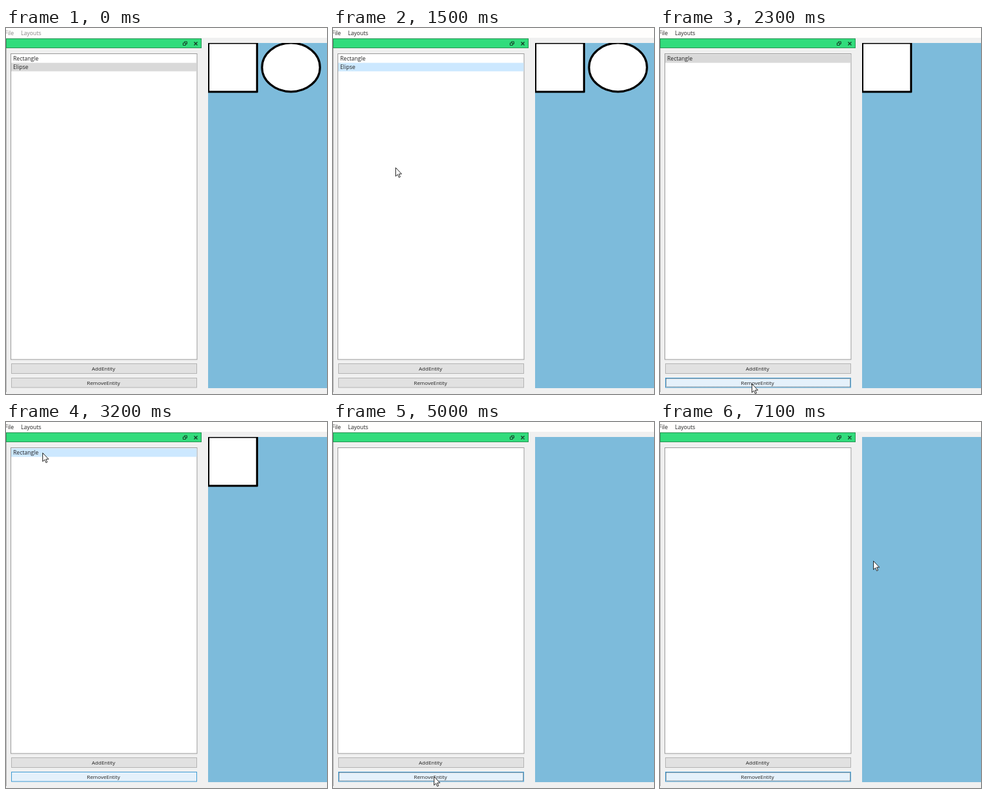
An HTML page that plays this animation: 494x562 px, repeating every 7200 ms.

```html
<!DOCTYPE html>
<html lang="en">
<head>
<meta charset="utf-8">
<title>Entity list</title>
<style>
  html, body { margin: 0; width: 100%; height: 100%; overflow: hidden; background: #f0f0f0; }
  svg { display: block; width: 100%; height: 100%; }
  text { font: 8.6px "Open Sans", "Noto Sans", sans-serif; fill: #222; }
  .label { font-size: 8px; text-anchor: middle; }
  .shape { fill: #fff; stroke: #000; stroke-width: 3.2; stroke-linejoin: round; }
</style>
</head>
<body>
<svg viewBox="0 0 494 562">
  <defs><clipPath id="view"><rect x="311" y="23" width="183" height="530"/></clipPath></defs>
  <rect width="494" height="562" fill="#f0f0f0"/>
  <rect width="494" height="15" fill="#fffefd"/>
  <g id="menu">
    <text x="-1.5" y="11">File</text>
    <text x="23" y="11">Layouts</text>
  </g>

  <path d="M.5 16V559" stroke="#b4b4b4"/>
  <rect x=".5" y="16.5" width="300" height="14" fill="#32dc7c" stroke="#279653"/>
  <g fill="none" stroke="#143d27">
    <path d="M274.5 22.5v-1.5h4v3.5h-1.5M272.5 23h4v3.5h-4z"/>
    <path d="M289.5 21.5l5 5m0-5l-5 5" stroke-width="1.4"/>
  </g>

  <rect x="7.5" y="39.5" width="286.5" height="469.5" fill="#fff" stroke="#9a9a9a"/>
  <g id="rectRow">
    <rect x="8" y="40.5" width="285.5" height="13"/>
    <text x="11" y="50.3">Rectangle</text>
  </g>
  <g id="ellipseRow">
    <rect x="8" y="53.5" width="285.5" height="13"/>
    <text x="11" y="63.3">Elipse</text>
  </g>

  <rect x="8.5" y="515.5" width="285" height="15" fill="#e1e1e1" stroke="#b4b4b4"/>
  <text class="label" x="150" y="526">AddEntity</text>
  <rect id="remove" x="8.5" y="537.5" width="285" height="14.5"/>
  <rect id="focus" x="9.5" y="538.5" width="283" height="12.5" fill="none" stroke="#555" stroke-dasharray="1 1"/>
  <text class="label" x="150" y="548">RemoveEntity</text>

  <g clip-path="url(#view)">
    <rect x="311" y="23" width="183" height="530" fill="#7dbbdb"/>
    <rect id="square" class="shape" x="311.4" y="23" width="75" height="75"/>
    <ellipse id="oval" class="shape" cx="438.6" cy="60.4" rx="44.6" ry="37.4"/>
  </g>
  <path id="cursor" d="M0 0V13.2L3 10.4L5 15L7 14.1L5 9.6H9.1Z" fill="#fff" stroke="#111" stroke-width=".9"/>
</svg>
<script>
const LOOP = 7200, STEP = 100;
const $ = id => document.getElementById(id);
const show = (id, on) => $(id).setAttribute('visibility', on ? 'visible' : 'hidden');

// time, x, y of the pointer tip
const route = [
  [300, 170, 562], [800, 60, 60], [1200, 60, 60], [1500, 96, 214],
  [1800, 141, 546], [2600, 141, 546], [3000, 56, 47], [3800, 56, 47],
  [4400, 155, 544], [5100, 155, 544], [5400, 189, 236], [5800, 189, 236],
  [5900, 197, 235], [6500, 328, 213]
];

const looks = {
  normal: ['#e1e1e1', '#b4b4b4'],
  hover: ['#e5f1fb', '#3f9bd3'],
  pressed: ['#cce4f7', '#28709f']
};
const buttonSteps = [
  [0, 'normal'], [1800, 'hover'], [2000, 'pressed'], [2100, 'hover'],
  [3600, 'normal'], [4400, 'hover'], [4900, 'pressed'], [5000, 'hover']
];
const GRAY = '#d9d9d9', BLUE = '#cce8ff';
const rectSteps = [[0, 'none'], [2000, GRAY], [3100, BLUE], [4900, GRAY]];
const ellipseSteps = [[0, GRAY], [1000, BLUE], [1900, GRAY]];

const stepAt = (steps, t) => steps.filter(s => s[0] <= t).pop()[1];

function pointerAt(t) {
  const next = route.findIndex(p => p[0] > t);
  if (next < 0) return route[route.length - 1].slice(1);
  if (next === 0) return route[0].slice(1);
  const [t0, x0, y0] = route[next - 1], [t1, x1, y1] = route[next];
  const k = (t - t0) / (t1 - t0);
  return [x0 + (x1 - x0) * k, y0 + (y1 - y0) * k];
}

function draw(t) {
  $('menu').setAttribute('opacity', t < 1000 ? 0.55 : 1);
  $('rectRow').firstElementChild.setAttribute('fill', stepAt(rectSteps, t));
  $('ellipseRow').firstElementChild.setAttribute('fill', stepAt(ellipseSteps, t));
  ['ellipseRow', 'oval'].forEach(id => show(id, t < 2000));
  ['rectRow', 'square'].forEach(id => show(id, t < 5000));

  const [fill, stroke] = looks[stepAt(buttonSteps, t)];
  $('remove').setAttribute('fill', fill);
  $('remove').setAttribute('stroke', stroke);
  show('focus', (t >= 1900 && t < 3100) || t >= 4900);

  show('cursor', t >= 300);
  const [x, y] = pointerAt(t).map(Math.round);
  $('cursor').setAttribute('transform', `translate(${x + 0.5} ${y + 0.5})`);
}

const start = performance.now();
function tick() {
  const t = (performance.now() - start) % LOOP;
  draw(Math.floor(t / STEP) * STEP);
  requestAnimationFrame(tick);
}
tick();
</script>
</body>
</html>
```
